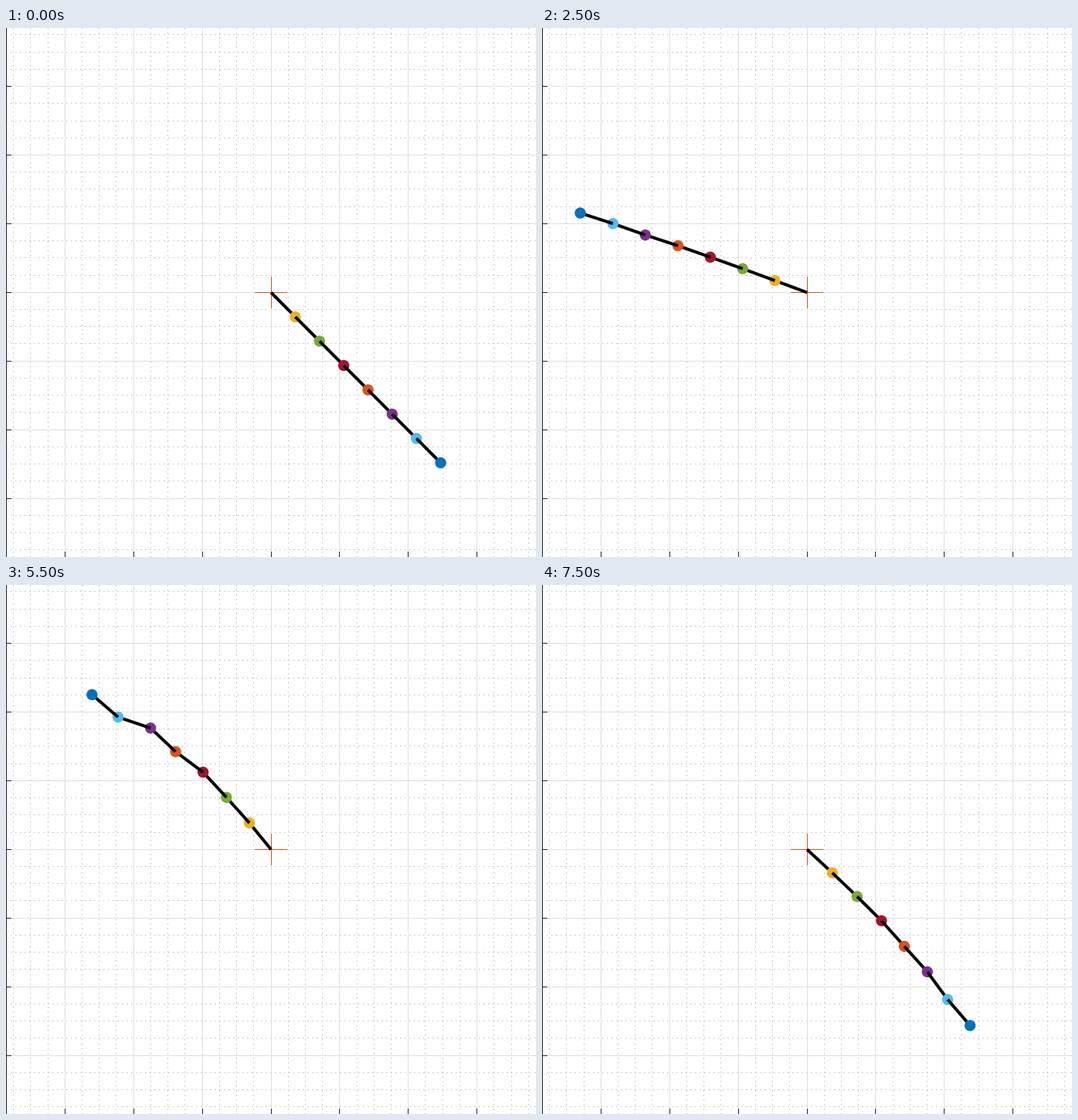
Recreate the animation shown at these times as a matplotlib script. Size 686 px wide and 685 px high, loop 8000 ms.

```python
import numpy as np
import matplotlib.pyplot as plt
from matplotlib.animation import FuncAnimation
from matplotlib.patches import Circle

W, H, DPI = 686, 685, 100
PX = 72 / DPI  # points per pixel
STEPS = 16
PIVOT = np.array([343.1, 342.5])
LINK = 44.45
COLORS = ["#EDB120", "#77AC30", "#A2142F", "#D95319",
          "#7E2F8E", "#4DBEEE", "#0072BD"]
INK, ORANGE = "#262626", "#D95319"

# Link profiles: a slow arch and a kink near the tip
N = np.arange(len(COLORS))
ARCH = -np.cos(np.pi * N / 5.5)
KINK = (-0.5) ** np.abs(N - 5)
KEYS = [0, 5, 7, 9, 12, 15]
ARCH_SIZE = [0, 1, 9, 18, 4, -4]
KINK_SIZE = [0, -1, 12, 10, 17, -3]


def heading(step):
    """Direction of the tip in degrees: a wide pendulum swing about 90."""
    x = 2 * np.pi * (max(step, 1.115) - 3.93) / 15.68
    return 90 + 149 * np.sin(x) + 2.8 * np.sin(2 * x) + 6.9 * np.sin(3 * x)


def joints(step):
    """Pixel positions of the pivot and the seven joints."""
    bend = (np.interp(step, KEYS, ARCH_SIZE) * ARCH
            + np.interp(step, KEYS, KINK_SIZE) * KINK)
    links = LINK * np.exp(1j * np.radians(bend))
    chord = links.sum()
    links *= np.exp(1j * np.radians(heading(step))) * abs(chord) / chord
    z = np.concatenate([[0], np.cumsum(links)])
    return PIVOT[0] + z.real, PIVOT[1] - z.imag


fig = plt.figure(figsize=(W / DPI, H / DPI), dpi=DPI, facecolor="white")
ax = fig.add_axes([0, 0, 1, 1])
ax.set(xlim=(0, W), ylim=(H, 0))
ax.axis("off")


def stroke(xs, ys, color, width=1, **kw):
    return ax.plot(xs, ys, color=color, lw=width * PX, snap=False,
                   solid_capstyle="butt", dash_capstyle="butt", **kw)[0]


def pixel(v):
    return np.floor(v) + 0.5


# Grid: every fourth line is solid, the others dotted
for k in range(-15, 16):
    x = pixel(342.92 + k * 88.88 / 4) if k else 343.5
    y = pixel(342.3 + k * 88.9 / 4)
    if k % 4:
        style = dict(color="#BDBDBD", ls=(0, (1.5, 4.5)), zorder=1)
    else:
        style = dict(color="#DEDEDE", zorder=2)
        stroke([x, x], [H - 7, H], INK, zorder=3)
        stroke([0, 7], [y, y], INK, zorder=3)
    stroke([x, x], [0, H], **style)
    stroke([0, W], [y, y], **style)
stroke([0.5, 0.5], [0, H], INK, zorder=3)

# Cross at the pivot
stroke([343.5, 343.5], [322, 363], ORANGE, zorder=4)
stroke([322, 364], [342.5, 342.5], ORANGE, zorder=4)

rods, dots = [], []
for i, color in enumerate(COLORS):
    rods.append(stroke([], [], "black", 4, zorder=5 + 2 * i))
    dots.append(ax.add_patch(Circle(PIVOT, 7.2, fc=color, lw=0,
                                    zorder=6 + 2 * i)))


def update(step):
    x, y = joints(step)
    for i, (rod, dot) in enumerate(zip(rods, dots)):
        rod.set_data(x[i:i + 2], y[i:i + 2])
        dot.center = x[i + 1], y[i + 1]
    return rods + dots


anim = FuncAnimation(fig, update, frames=STEPS, interval=500,
                     repeat=True, repeat_delay=0)
plt.show()
```
